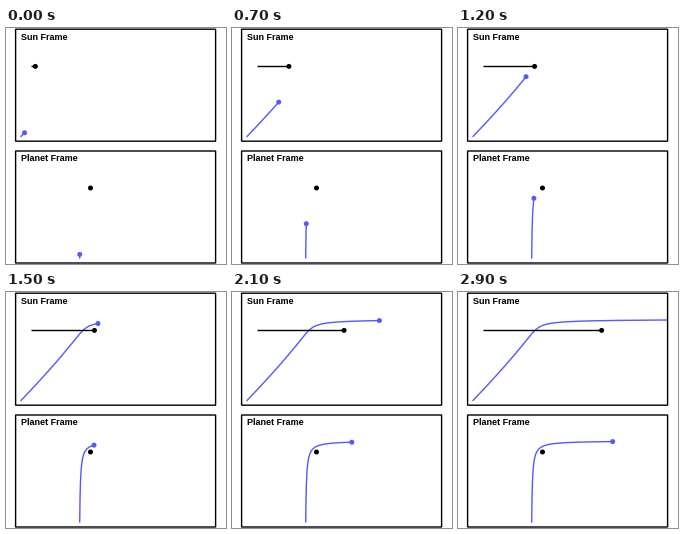
Recreate the animation shown at these times as a matplotlib script. Size 220 by 236 pixels, loop 3000 ms.

```python
import numpy as np
import matplotlib.pyplot as plt
from matplotlib.animation import FuncAnimation
from matplotlib.patches import Circle, Rectangle

W, H, DPI = 220, 236, 100
FRAMES, INTERVAL = 30, 100
PT = 72 / DPI                      # one pixel in points
BLUE, BLACK = "#5757ff", "black"

# Hyperbolic flyby with a right-angle turn, seen from the planet
PLANET = np.array([84.5, 160.0])
CENTER = np.array([72.9, 148.8])   # where the asymptotes cross
A = 11.4                           # semi-major axis
ECC = np.sqrt(2)
MEAN_MOTION = 0.319
MIDDLE = 14                        # step of closest approach
PLANET_SPEED = 3.94
SHIFT_Y = -121.6                   # from the lower panel to the upper one


def flyby(step):
    """Ship position relative to the panel of the planet frame."""
    mean = MEAN_MOTION * (np.asarray(step, float) - MIDDLE)
    anomaly = np.arcsinh(mean / ECC)
    for _ in range(12):
        error = ECC * np.sinh(anomaly) - anomaly - mean
        anomaly = anomaly - error / (ECC * np.cosh(anomaly) - 1)
    scale = A / np.sqrt(2)
    return (CENTER[0] + scale * np.exp(anomaly),
            CENTER[1] + scale * np.exp(-anomaly))


def drift(step):
    """Distance the planet has moved in the sun frame."""
    return PLANET_SPEED * (np.asarray(step, float) - MIDDLE)


fig = plt.figure(figsize=(W / DPI, H / DPI), dpi=DPI, facecolor="white")
ax = fig.add_axes([0, 0, 1, 1])
ax.set_xlim(0, W)
ax.set_ylim(H, 0)
ax.axis("off")


def panel(top, title, baseline):
    box = Rectangle((9.6, top), 200, 112, fill=False, ec=BLACK,
                    lw=1.4 * PT, snap=False, zorder=5)
    ax.add_patch(box)
    ax.text(15.1, baseline, title, family="Liberation Sans", weight="bold",
            size=9 * PT, color=BLACK, va="baseline", zorder=6)
    return box


def trail(color, box, z):
    line, = ax.plot([], [], color=color, lw=1.4 * PT, zorder=z,
                    solid_capstyle="butt")
    line.set_clip_path(box)
    return line


def dot(color, box, z):
    patch = Circle((0, 0), 2.5, fc=color, ec="none", zorder=z)
    ax.add_patch(patch)
    patch.set_clip_path(box)
    return patch


sun_box = panel(1.2, "Sun Frame", 11.8)
planet_box = panel(123, "Planet Frame", 133.3)

sun_ship_trail = trail(BLUE, sun_box, 2)
sun_planet_trail = trail(BLACK, sun_box, 3)
sun_ship = dot(BLUE, sun_box, 4)
sun_planet = dot(BLACK, sun_box, 4)
planet_ship_trail = trail(BLUE, planet_box, 2)
planet_ship = dot(BLUE, planet_box, 4)
dot(BLACK, planet_box, 4).center = PLANET


def update(frame):
    steps = np.linspace(-1, frame, 12 * (frame + 1) + 1)
    x, y = flyby(steps)
    moved = drift(steps)
    planet_x = PLANET[0] + moved
    planet_y = PLANET[1] + SHIFT_Y

    planet_ship_trail.set_data(x, y)
    planet_ship.center = x[-1], y[-1]
    sun_ship_trail.set_data(x + moved, y + SHIFT_Y)
    sun_ship.center = x[-1] + moved[-1], y[-1] + SHIFT_Y
    sun_planet_trail.set_data(planet_x, np.full_like(planet_x, planet_y))
    sun_planet.center = planet_x[-1], planet_y
    return (planet_ship_trail, planet_ship, sun_ship_trail, sun_ship,
            sun_planet_trail, sun_planet)


anim = FuncAnimation(fig, update, frames=FRAMES, interval=INTERVAL,
                     repeat=True, repeat_delay=0, blit=False)
plt.show()
```
